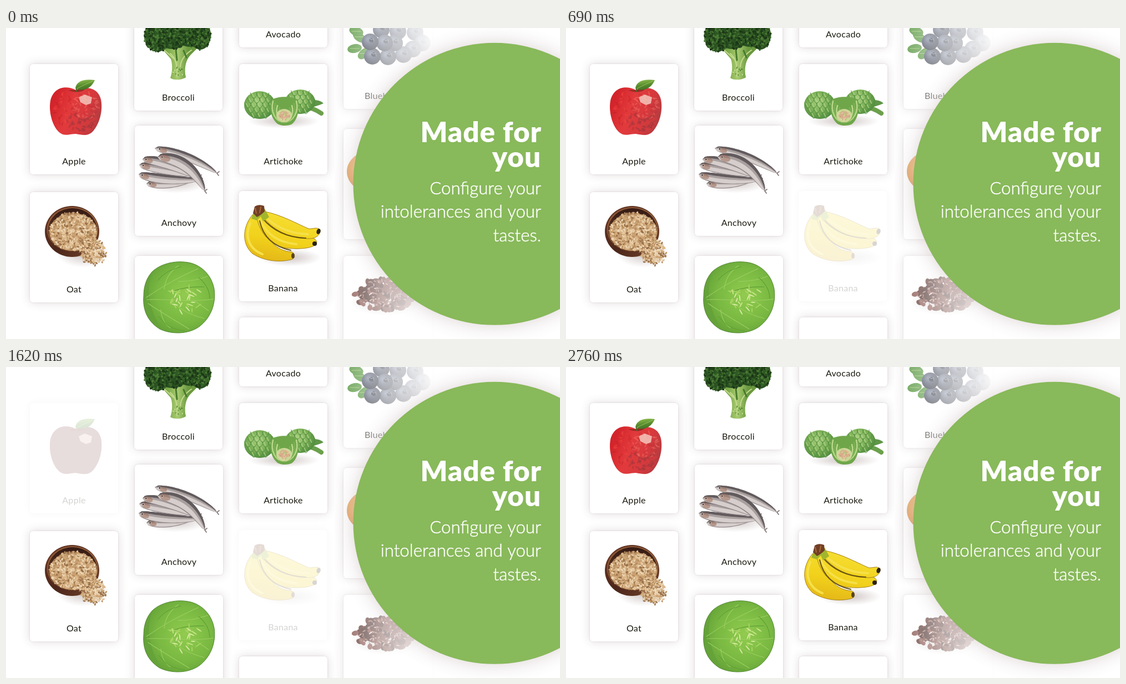
An HTML page with a canvas for the animation above (2.79 s loop, 998 by 561 pixels).

```html
<!DOCTYPE html>
<html lang="en">
<head>
<meta charset="utf-8">
<title>Made for you</title>
<style>
  html, body { margin: 0; width: 100%; height: 100%; overflow: hidden; background: #fff; }
  canvas { position: absolute; left: 0; top: 0; }
</style>
</head>
<body>
<script>
const W = 998, H = 561, LOOP = 2790;
const FADED = 0.18, FADE_MS = 200, RETURN_AT = 2385;
const TAU = Math.PI * 2;
let g; // context currently drawn on

function layer() {
  const canvas = document.createElement('canvas');
  canvas.width = W;
  canvas.height = H;
  document.body.append(canvas);
  return canvas.getContext('2d');
}

function randomFrom(seed) {
  return () => {
    seed = (seed + 0x6D2B79F5) | 0;
    let r = Math.imul(seed ^ (seed >>> 15), 1 | seed);
    r = (r + Math.imul(r ^ (r >>> 7), 61 | r)) ^ r;
    return ((r ^ (r >>> 14)) >>> 0) / 4294967296;
  };
}

function fill(path, style, alpha = 1) {
  g.globalAlpha = alpha;
  g.fillStyle = style;
  g.fill(new Path2D(path));
  g.globalAlpha = 1;
}

function stroke(path, style, width = 1) {
  g.strokeStyle = style;
  g.lineWidth = width;
  g.lineCap = 'round';
  g.stroke(new Path2D(path));
}

function oval(x, y, rx, ry, style, turn = 0) {
  g.beginPath();
  g.ellipse(x, y, rx, ry, turn, 0, TAU);
  g.fillStyle = style;
  g.fill();
}

function radial(x, y, r, ...colors) {
  const gradient = g.createRadialGradient(x, y, 0, x, y, r);
  colors.forEach((c, i) => gradient.addColorStop(i / (colors.length - 1), c));
  return gradient;
}

function linear(x0, y0, x1, y1, ...colors) {
  const gradient = g.createLinearGradient(x0, y0, x1, y1);
  colors.forEach((c, i) => gradient.addColorStop(i / (colors.length - 1), c));
  return gradient;
}

// Small ovals strewn at random over a larger oval.
function scatter(count, x, y, rx, ry, colors, length, width) {
  const random = randomFrom(count + x);
  for (let i = 0; i < count; i++) {
    const a = random() * TAU, d = Math.sqrt(random());
    oval(x + Math.cos(a) * d * rx, y + Math.sin(a) * d * ry, length * (0.6 + random() * 0.5), width,
      colors[Math.floor(random() * colors.length)], random() * Math.PI);
  }
}

function softShadow(x, y, rx, ry) {
  g.save();
  g.translate(x, y);
  g.scale(1, ry / rx);
  oval(0, 0, rx, rx, radial(0, 0, rx, 'rgba(120,95,90,.35)', 'rgba(120,95,90,0)'));
  g.restore();
}

function text(str, x, y, font, color, align, spacing = 0) {
  g.font = font + ' Lato, sans-serif';
  g.letterSpacing = spacing + 'px';
  g.textAlign = align;
  g.fillStyle = color;
  g.fillText(str, x, y);
}

function card(x, y, label, food) {
  g.save();
  g.shadowColor = 'rgba(100,70,75,.2)';
  g.shadowBlur = 17;
  g.fillStyle = '#fff';
  g.beginPath();
  g.roundRect(x, y, 159, 199, 6);
  g.fill();
  g.shadowColor = 'rgba(100,70,75,.16)';
  g.shadowBlur = 3;
  g.fill();
  g.clip();
  g.shadowColor = 'transparent';
  if (food) food();
  g.restore();
  text(label, x + 79.5, y + 181, '400 16px', '#1b1a10', 'center', 0.3);
}

function apple(shown = 1) {
  const body = 'M126 112C110 103 86 105 80 131C76 153 85 180 97 189C106 196 115 191 126 191' +
    'C137 193 148 196 157 186C169 172 175 148 171 129C166 107 143 104 126 112Z';
  fill(body, linear(84, 140, 170, 172, '#d3242b', '#e23a3c', '#d8393d', '#b03c40'));
  scatter(70, 142, 140, 24, 24, ['rgba(240,110,100,.5)', 'rgba(190,45,50,.4)'], 4, 1.2);
  scatter(80, 136, 169, 26, 18, ['rgba(165,55,60,.55)', 'rgba(220,60,62,.4)'], 4, 1.5);
  scatter(28, 104, 145, 17, 30, ['rgba(240,70,65,.5)', 'rgba(185,30,38,.4)'], 4, 1.2);
  fill(body, '#7a4a4a', Math.min(1, 2 * (1 - shown)) * 0.95);
  fill('M115 119C128 115 160 113 169 128C166 143 164 158 149 166C143 157 149 147 135 145C122 139 113 130 115 119Z',
    '#f05a14', 4 * shown * (1 - shown) * 0.8);
  fill('M131 125L142 120L155 125L153 136L144 139L134 134Z', '#f7cfc4', 0.8);
  fill('M112 112C122 117 136 117 143 110C136 111 131 110 126 112Z', '#842a20', 0.8);
  stroke('M127 114C126 106 130 101 134 98', '#59632a', 2.5);
  fill('M125 109C126 97 139 91 160 94C154 108 140 116 125 109Z',
    linear(140, 93, 143, 113, '#8dbb4c', '#578c2e', '#3e6b25'));
  stroke('M128 109C138 104 147 100 156 96', '#a9c96b', 0.8);
}

function oat() {
  const flakes = ['#e5c9a2', '#cda473', '#b88e60', '#dcb88a', '#98704a', '#edd7b6'];
  softShadow(140, 408, 48, 24);
  oval(119, 367, 49, 46, linear(72, 330, 160, 412, '#6d3a25', '#4a251a', '#72422b'));
  oval(120, 363, 46, 40, '#8f5a38');
  oval(120, 364, 44, 39, linear(120, 325, 120, 400, '#351b14', '#6d4128'));
  oval(121, 368, 43, 34, '#c39b6e');
  scatter(620, 121, 367, 42, 34, flakes, 3, 1.5);
  scatter(300, 155, 402, 22, 23, flakes, 3, 1.5);
  scatter(45, 157, 407, 24, 22, flakes, 2.6, 1.3);
}

function broccoli() {
  fill('M270 28C282 37 290 48 297 56C301 68 299 82 296 90C302 95 317 94 324 89' +
    'C321 75 323 62 329 53C334 46 344 38 352 28L330 18L283 18Z',
    linear(290, 40, 328, 40, '#78a646', '#a9cb70', '#6a983f'));
  stroke('M296 46Q310 57 308 87M334 40Q315 53 314 70M283 38L302 55', '#c2da8e', 2);
  stroke('M306 39L308 58M320 41L325 53', '#477b2c', 3);
  scatter(18, 311, 80, 10, 9, ['#5f923c', '#c1db8e'], 2, 1);
  const green = ['#213f1a', '#2e5922', '#3a672a', '#1a3316', '#4b7a35'];
  for (const [x, y, rx, ry] of [[273, 15, 24, 28], [300, 9, 32, 29], [332, 7, 30, 27], [350, 13, 19, 26]]) {
    oval(x, y, rx, ry, '#294f20');
    scatter(260, x, y, rx, ry, green, 2.6, 1.8);
  }
}

// A tapered body along a quadratic curve, head first.
function fish(x0, y0, cx, cy, x1, y1, size) {
  const at = (t, side) => {
    const u = 1 - t;
    const dx = u * (cx - x0) + t * (x1 - cx), dy = u * (cy - y0) + t * (y1 - cy);
    const w = side * size * 1.9 * t ** 0.4 * u ** 0.6 / Math.hypot(dx, dy);
    return [u * u * x0 + 2 * u * t * cx + t * t * x1 - dy * w,
            u * u * y0 + 2 * u * t * cy + t * t * y1 + dx * w];
  };
  const band = (from, to, color) => {
    const points = [];
    for (let i = 0; i <= 24; i++) {
      points.push(at(i / 24, from));
      points.unshift(at(i / 24, to));
    }
    fill('M' + points.join('L') + 'Z', color);
  };
  band(-1, 1, '#8f8586');
  band(-1, -0.45, '#625b5d');
  band(-0.45, 0, '#a89f9f');
  band(0, 0.85, '#d6cecc');
  g.globalAlpha = 0.55;
  oval(...at(0.12, 0.1), size * 0.9, size * 0.55, '#9b6a56', 0.3);
  g.globalAlpha = 1;
  oval(...at(0.07, -0.1), 2.1, 2.1, '#e4dcd8');
  oval(...at(0.07, -0.1), 1.3, 1.3, '#211a1b');
  stroke(`M${x1} ${y1}l4 -3M${x1} ${y1}l3 4`, '#8b8080', 2);
}

function anchovy() {
  softShadow(305, 278, 60, 20);
  fish(253, 281, 300, 286, 348, 268, 8);
  fish(239, 264, 284, 277, 350, 274, 9);
  fish(240, 247, 290, 256, 343, 266, 9);
  fish(246, 237, 290, 239, 348, 272, 9);
  fish(268, 217, 332, 228, 380, 262, 8);
  fish(273, 233, 332, 234, 358, 294, 11);
}

function cabbage() {
  const body = 'M263 440C279 424 309 418 333 424C355 430 371 448 375 471C379 500 367 524 349 538' +
    'C329 553 298 553 277 543C256 530 246 510 248 484C248 464 254 450 263 440Z';
  fill(body, radial(322, 482, 76, '#92cb4f', '#84c248', '#78b741', '#65a238'));
  fill('M264 442C252 467 256 504 278 540C254 528 245 502 249 480C250 464 255 450 264 442Z', '#65a23a');
  stroke('M253 486C281 467 302 454 346 434M254 490C292 488 333 495 374 489M256 497C282 514 300 525 330 543' +
    'M285 471Q287 446 310 429M310 457Q336 458 363 448M299 491Q313 512 357 524M338 491L365 510M279 508Q280 530 296 541',
    '#9bcf61', 1.1);
  stroke('M274 455Q288 437 315 431M347 450Q367 467 367 488M275 520Q292 544 322 546M303 474Q326 466 357 467',
    '#5f9f36', 1.1);
  scatter(32, 322, 487, 30, 26, ['#cbe58d', '#a9d562', '#d9ecA4'], 6, 1);
  stroke(body, '#4d862e', 1);
}

function globe(x, y, rx, ry) {
  oval(x, y, rx, ry, radial(x - 3, y - 6, rx * 1.2, '#a9d07f', '#7fb35a', '#4d8a3c'));
  for (let row = -2; row <= 2; row++) {
    for (let col = -2; col <= 2; col++) {
      const px = x + (col + (row & 1) / 2) * rx * 0.38, py = y + row * ry * 0.36;
      if (((px - x) / rx) ** 2 + ((py - y) / ry) ** 2 > 0.75) continue;
      stroke(`M${px - 6} ${py - 4}Q${px - 4} ${py + 5} ${px} ${py + 6}Q${px + 5} ${py + 4} ${px + 6} ${py - 4}`,
        '#56903f', 1);
      stroke(`M${px - 3} ${py - 3}L${px} ${py + 3}`, '#b3d58b', 1.2);
    }
  }
}

function artichoke() {
  softShadow(500, 168, 64, 13);
  stroke('M540 143Q556 145 568 154', '#6ca04c', 8);
  fill('M538 132Q562 126 572 136Q556 143 536 146Z', '#5f9647');
  globe(530, 133, 27, 22);
  globe(457, 139, 28, 25);
  fill('M478 130C487 123 516 122 526 130C530 148 524 168 514 174C506 177 492 177 487 171C476 160 474 142 478 130Z', '#6fa64a');
  for (let i = 0; i < 4; i++) {
    const d = i * 4;
    stroke(`M${481 + d} ${132 + d}C${476 + d} ${151 + d / 2} ${485 + d} 169 501 170` +
      `C${518 - d} 169 ${528 - d} ${151 + d / 2} ${523 - d} ${132 + d}`, i % 2 ? '#7cb255' : '#b9d88a', 2.5);
  }
  oval(501, 158, 14, 12, '#ced698');
  oval(501, 157, 10, 7, '#d9ad8c');
  scatter(26, 501, 158, 10, 9, ['#e9d3ae', '#d29c80', '#b5cc78'], 2.4, 0.8);
}

function banana(shown = 1) {
  const fingers = [
    'M444 337C427 357 423 388 444 407C467 422 497 423 516 417C521 413 520 406 515 404C488 402 466 383 461 340Z',
    'M451 338C455 366 474 392 505 397C530 400 552 397 559 390C562 383 555 378 547 378C512 378 484 362 468 336Z',
    'M458 333C472 358 505 380 545 380C560 380 567 372 566 364C560 358 553 363 545 362C522 352 496 337 466 331Z'
  ];
  const ridges = 'M440 352C429 378 439 399 462 408M459 348C470 373 492 387 523 390M473 346C492 362 515 371 544 372';
  const tint = 4 * shown * (1 - shown) * 0.75;
  softShadow(512, 414, 56, 16);
  for (const path of fingers) {
    fill(path, linear(480, 338, 465, 422, '#f5dc2e', '#f1d11b', '#e3b518'));
    fill(path, '#e28d20', tint);
    stroke(path, '#a5811c', 1);
  }
  stroke(ridges, '#f6e04a', 4);
  stroke(ridges, `rgba(237,180,95,${tint})`, 4);
  stroke('M457 348C463 377 481 394 513 401M462 343C481 366 507 378 540 379', '#685313', 2);
  fill('M442 344L447 329L466 326L474 341L463 349L459 340L452 347Z', '#a2b62d');
  fill('M445 334L448 322Q455 317 465 321L466 331Q457 339 452 341Z', '#713e25');
  stroke('M449 325L451 334M459 323L457 333', '#a96a38', 2);
  oval(563, 367, 3.5, 5, '#292318', 0.3);
  oval(556, 389, 4, 4, '#292318');
  oval(517, 411, 3, 5, '#5a461b');
}

function blueberry() {
  for (const [x, y, turn] of [[628, 37, -0.2], [636, 16, 0.7], [631, 6, 0.3], [645, 46, -0.7]]) {
    oval(x, y, 13, 8, '#4e9135', turn);
    stroke(`M${x - 8} ${y}L${x + 8} ${y}`, '#9bc36e', 1);
  }
  for (const [x, y] of [[676, 3], [706, 6], [737, 8], [750, 27], [733, 38], [716, 48], [700, 27],
    [688, 52], [660, 51], [682, 27], [656, 25]]) {
    oval(x, y, 15, 15, radial(x - 4, y - 5, 20, '#6f7a94', '#3c4459', '#1a1d2b'));
    oval(x + 3, y - 3, 5, 4, '#1b1f2d');
    stroke(`M${x - 1} ${y - 6}l3 2l4 -2l1 5`, '#8590a8', 1);
  }
}

function peach() {
  oval(662, 259, 48, 39, radial(652, 250, 48, '#f7c98b', '#eeae62', '#d88d45'));
}

function beans() {
  softShadow(685, 494, 65, 25);
  scatter(130, 685, 481, 56, 28, ['#4e241e', '#693831', '#7d463f', '#3a1c18'], 8, 4.5);
  scatter(70, 684, 479, 55, 26, ['#b0857c', '#986860', '#c9a49b'], 3, 1);
}

function drawScene() {
  card(43, 296, 'Oat', oat);
  card(231, -50, 'Broccoli', broccoli);
  card(232, 176, 'Anchovy', anchovy);
  card(232, 411, '', cabbage);
  card(420, -164, 'Avocado');
  card(420, 65, 'Artichoke', artichoke);
  card(420, 522, '');
  card(608, -53, 'Blueberries', blueberry);
  card(608, 182, '', peach);
  card(608, 411, '', beans);

  // White veil that dissolves the last column to the right.
  g.fillStyle = linear(590, 0, 772, 0, 'rgba(255,255,255,.12)', 'rgba(255,255,255,.62)', '#fff');
  g.fillRect(597, 0, W, H);

  g.save();
  g.shadowColor = 'rgba(110,70,75,.25)';
  g.shadowBlur = 34;
  oval(880, 281.3, 254.5, 254.5, '#88b95a');
  g.restore();
  text('Made for', 965, 206, '900 51px', '#fff', 'right', 1);
  text('you', 964, 251, '900 51px', '#fff', 'right', 1);
  g.strokeStyle = '#fff';
  g.lineWidth = 0.5;
  ['Configure your', 'intolerances and your', 'tastes.'].forEach((line, i) => {
    const y = 299.5 + i * 42.7;
    text(line, 964, y, '300 31.2px', '#fff', 'right');
    g.strokeText(line, 964, y);
  });
}

const clamp = v => Math.max(0, Math.min(1, v));
const fading = [
  { x: 43, y: 65, label: 'Apple', food: apple, out: 1100 },
  { x: 419.5, y: 294, label: 'Banana', food: banana, out: 388 }
];

g = layer();
drawScene();
for (const item of fading) item.ctx = layer();

function frame(now) {
  const t = now % LOOP;
  for (const { x, y, label, food, out, ctx } of fading) {
    const shown = 1 - clamp((t - out) / FADE_MS) + clamp((t - RETURN_AT) / FADE_MS);
    g = ctx;
    g.clearRect(0, 0, W, H);
    card(x, y, label, () => food(shown));
    ctx.canvas.style.opacity = FADED + (1 - FADED) * shown;
  }
  requestAnimationFrame(frame);
}
frame(performance.now());
</script>
</body>
</html>
```
